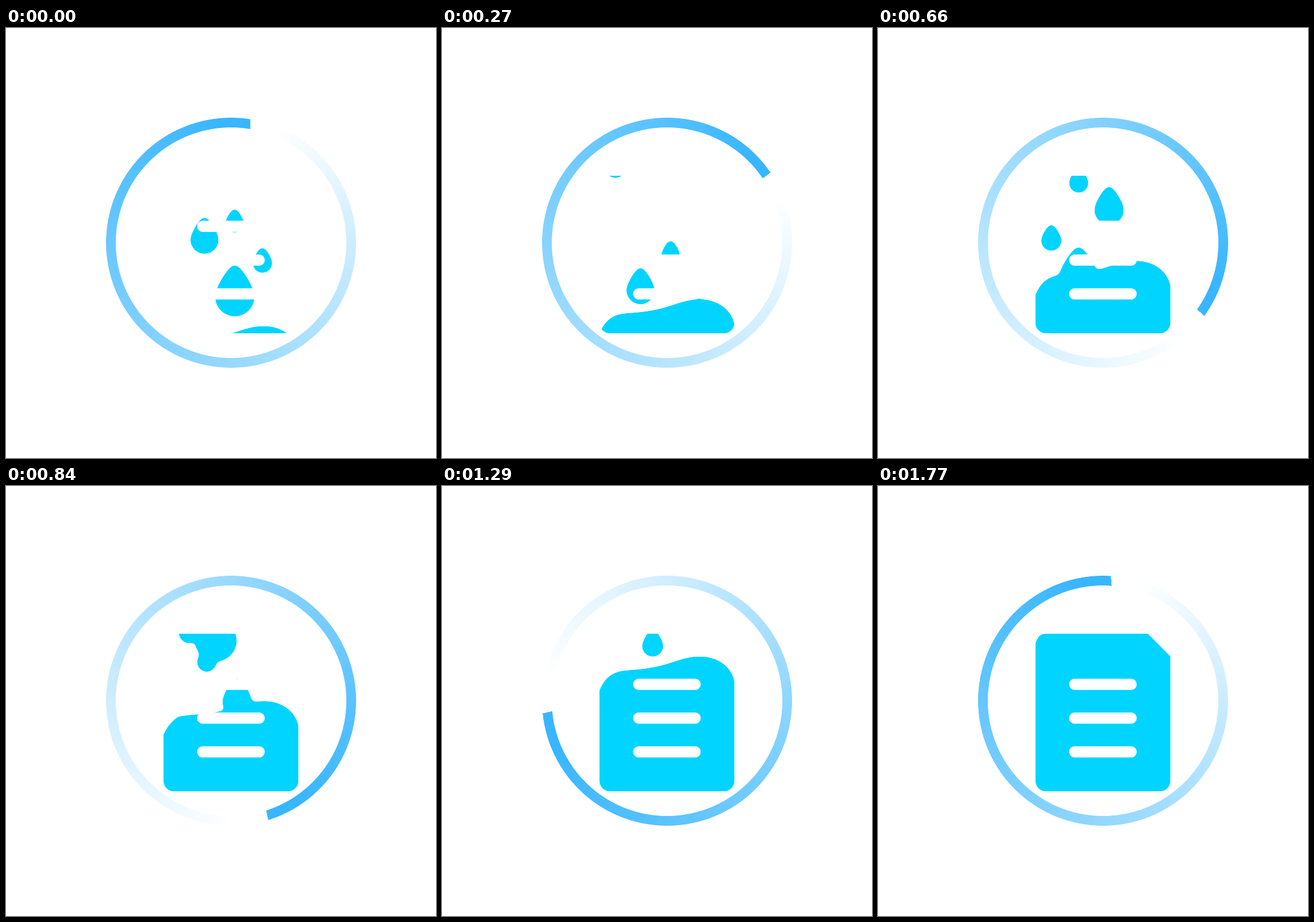
These frames come from a looping animation (748 by 748 pixels, 1.8 s). An HTML page:

```html
<!DOCTYPE html>
<html lang="en">
<head>
<meta charset="utf-8">
<title>Filling document loader</title>
<style>
  html, body { margin: 0; width: 100%; height: 100%; overflow: hidden; background: #fff; }
  #ring {
    position: absolute; left: 174px; top: 156.4px; width: 435px; height: 435px;
    --band: radial-gradient(circle, transparent 200.1px, #000 200.9px, #000 217px, transparent 217.8px);
    -webkit-mask: var(--band); mask: var(--band);
  }
  svg { position: absolute; left: 0; top: 0; }
</style>
</head>
<body>
<div id="ring"></div>
<svg width="748" height="748" viewBox="0 0 748 748">
  <defs>
    <clipPath id="page">
      <path d="M292 257H469.5L508.5 296.5V513a18 18 0 0 1-18 18H292a18 18 0 0 1-18-18V275a18 18 0 0 1 18-18Z"/>
    </clipPath>
    <filter id="goo" filterUnits="userSpaceOnUse" x="220" y="200" width="340" height="380" color-interpolation-filters="sRGB">
      <feGaussianBlur stdDeviation="4"/>
      <feColorMatrix values="0 0 0 0 0  0 0 0 0 .831  0 0 0 0 1  0 0 0 16 -7.3"/>
    </filter>
  </defs>
  <g clip-path="url(#page)">
    <g id="liquid" filter="url(#goo)" fill="#00d4ff">
      <path id="wave" d="M240 90L274 17C280 3 289 -14 315 -17.5C350 -20 370 -22 400 -32S435 -42 453 -42C480 -41 503 -25 508.5 0L530 90V420H240Z"/>
    </g>
  </g>
  <g id="bars" fill="#fff"></g>
</svg>
<script>
const LOOP = 1800, STEP = 30, PAGE_TOP = 257;
const ring = document.getElementById('ring');
const liquid = document.getElementById('liquid');
const wave = document.getElementById('wave');

function add(parent, tag, attrs) {
  const el = document.createElementNS('http://www.w3.org/2000/svg', tag);
  for (const key in attrs) el.setAttribute(key, attrs[key]);
  return parent.appendChild(el);
}

for (let i = 0; i < 3; i++)
  add(document.getElementById('bars'), 'rect',
    { x: 332.5, y: 335.3 + 58.75 * i, width: 117.5, height: 19.5, rx: 9.5 });

// Teardrop whose lowest point is the origin.
function dropPath(r) {
  const tip = -2.62 * r;
  return `M0 ${tip}C${.28 * r} ${tip} ${r} ${-1.48 * r} ${r} ${-r}` +
    `A${r} ${r} 0 0 1 ${-r} ${-r}C${-r} ${-1.48 * r} ${-.28 * r} ${tip} 0 ${tip}Z`;
}

// Heavier drops fall faster; each key is x: time of entering the page.
const sizes = [
  { r: 16.4, speed: .204, enter: { 397.7: -485, 349.2: 515 } },
  { r: 17.5, speed: .325, enter: { 446: -520, 301.5: 258, 318.7: 789, 366.5: 1167 } },
  { r: 25, speed: .325, enter: { 345.3: -418, 402: 398, 418.5: 921 } },
  { r: 35, speed: .56, enter: { 398: -437, 349: 273, 365: 754, 416.5: 1382 } }
];
const drops = sizes.flatMap(({ r, speed, enter }) =>
  Object.entries(enter).map(([x, time]) => ({
    x, time, speed,
    el: add(liquid, 'path', { d: dropPath(r * (1 + time * 5e-5)) }) // later drops are a little larger
  })));

function render(t) {
  const turn = t / LOOP * 360, rad = turn * Math.PI / 180;
  // The sweep pivots off-centre, so its edge is not quite radial.
  const cx = 242.7 + 8.8 * Math.cos(rad), cy = 197.1 + 8.8 * Math.sin(rad);
  ring.style.background =
    `conic-gradient(from ${turn}deg at ${cx}px ${cy}px, #fff 16deg, #38b6ff 345deg)`;

  wave.setAttribute('transform', `translate(0 ${561 - .172 * t})`);
  for (const d of drops)
    d.el.setAttribute('transform', `translate(${d.x} ${PAGE_TOP + d.speed * (t - d.time)})`);
}

const start = performance.now();
function frame(now) {
  const t = Math.max(0, now - start) % LOOP;
  render(Math.floor(t / STEP) * STEP);
  requestAnimationFrame(frame);
}
render(0);
requestAnimationFrame(frame);
</script>
</body>
</html>
```
